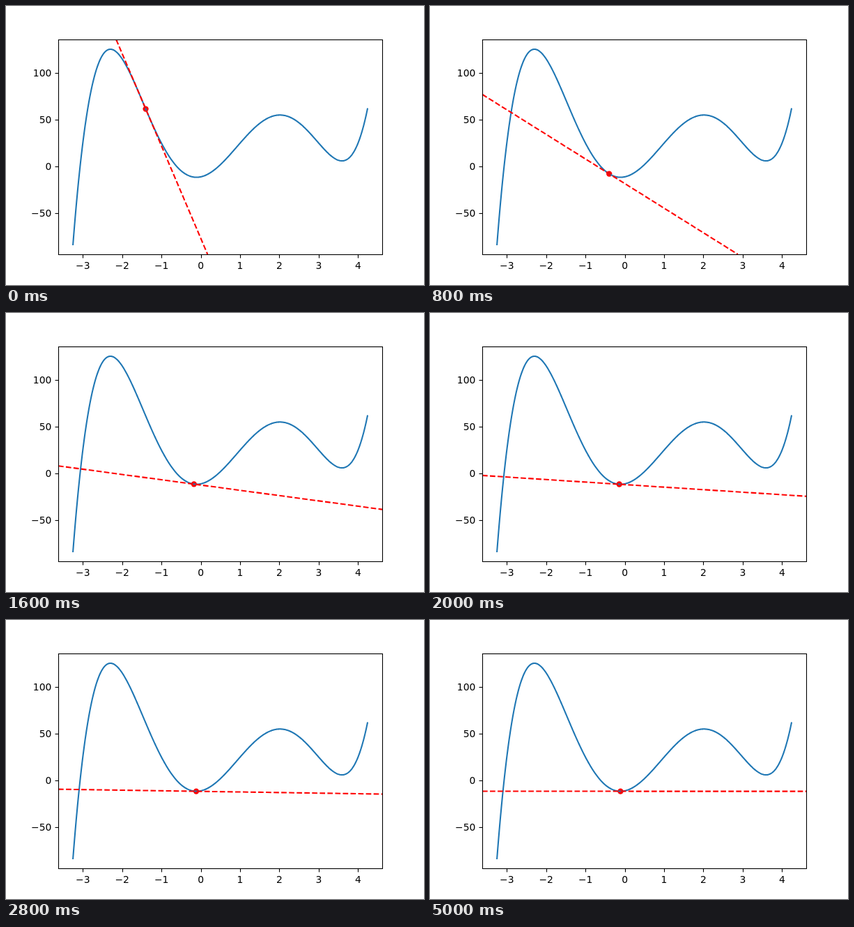
Animation of 600x400 px, one loop 5200 ms. Source, as an HTML page with a canvas:

```html
<!DOCTYPE html>
<html lang="en">
<head>
<meta charset="utf-8">
<title>Gradient descent</title>
<style>
  html, body { margin: 0; width: 100%; height: 100%; overflow: hidden; background: #fff; }
  canvas { display: block; }
</style>
</head>
<body>
<canvas id="plot" width="600" height="400"></canvas>
<script>
const ctx = document.getElementById('plot').getContext('2d');
const LOOP = 5200, STEP = 50, LAST = 100;
const START = -1.4, RATE = 0.001;
const LEFT = 75, RIGHT = 540, TOP = 48, BOTTOM = 356;

const f = x => ((((x - 4) * x - 10) * x + 40) * x + 9) * x - 11;
const slope = x => (((5 * x - 16) * x - 30) * x + 80) * x + 9;

// The data fills the axes with a 5% margin on every side.
const xs = Array.from({ length: 750 }, (_, i) => -3.25 + i / 100);
const ys = xs.map(f);
function scale(data, from, to) {
  const lo = Math.min(...data), hi = Math.max(...data);
  const k = (to - from) / 1.1 / (hi - lo);
  const map = v => from + (to - from) * 0.05 / 1.1 + (v - lo) * k;
  map.k = k;
  return map;
}
const px = scale(xs, LEFT, RIGHT), py = scale(ys, BOTTOM, TOP);

function line(points, color, width) {
  ctx.beginPath();
  points.forEach(([x, y]) => ctx.lineTo(x, y));
  ctx.strokeStyle = color;
  ctx.lineWidth = width;
  ctx.stroke();
}

function drawAxes() {
  const snap = v => Math.round(v) + 0.5;
  const label = v => String(v).replace('-', '\u2212');
  ctx.font = '13.89px "DejaVu Sans", sans-serif';
  ctx.fillStyle = '#000';
  ctx.textAlign = 'center';
  for (let v = -3; v <= 4; v++) {
    const x = snap(px(v));
    line([[x, BOTTOM + 0.5], [x, BOTTOM + 5.5]], '#000', 1.11);
    ctx.fillText(label(v), px(v), 377);
  }
  ctx.textAlign = 'right';
  for (let v = -50; v <= 100; v += 50) {
    const y = snap(py(v));
    line([[LEFT + 0.5, y], [LEFT - 4.5, y]], '#000', 1.11);
    ctx.fillText(label(v), 65.3, Math.round(py(v) + 5));
  }
  ctx.strokeStyle = '#000';
  ctx.lineWidth = 1.11;
  ctx.strokeRect(LEFT + 0.5, TOP + 0.5, RIGHT - LEFT, BOTTOM - TOP);
}

function drawTangent(x) {
  const m = slope(x) * py.k / px.k, cx = px(x), cy = py(f(x));
  const x0 = Math.max(LEFT, cx + (TOP - cy) / m);
  const x1 = Math.min(RIGHT, cx + (BOTTOM - cy) / m);
  ctx.setLineDash([7.708, 3.333]);
  line([x0, x1].map(u => [u, cy + (u - cx) * m]), '#f00', 2.083);
  ctx.setLineDash([]);
}

function draw(now) {
  const steps = Math.min(LAST, Math.floor(now % LOOP / STEP));
  let x = START;
  for (let i = 0; i < steps; i++) x -= RATE * slope(x);

  ctx.fillStyle = '#fff';
  ctx.fillRect(0, 0, 600, 400);
  ctx.save();
  ctx.beginPath();
  ctx.rect(LEFT, TOP, RIGHT - LEFT, BOTTOM - TOP);
  ctx.clip();
  ctx.fillStyle = '#f00';
  ctx.beginPath();
  ctx.arc(px(x), py(f(x)), 4.15, 0, 2 * Math.PI);
  ctx.fill();
  ctx.lineCap = 'square';
  ctx.lineJoin = 'round';
  line(xs.map((v, i) => [px(v), py(ys[i])]), '#1f77b4', 2.083);
  ctx.lineCap = 'butt';
  drawTangent(x);
  ctx.restore();
  drawAxes();
  requestAnimationFrame(draw);
}
draw(0);
</script>
</body>
</html>
```
